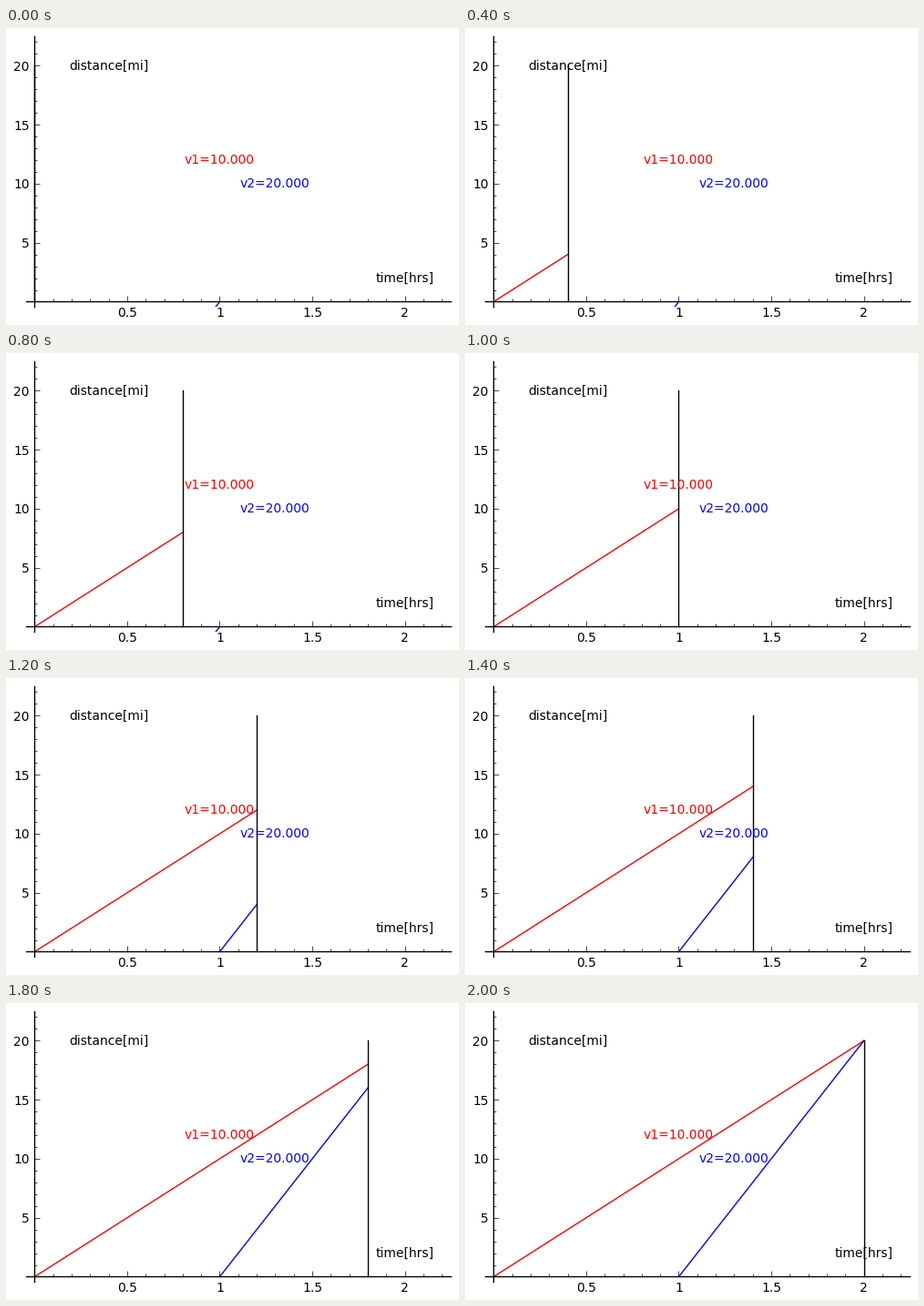
These frames come from a looping animation (497x326 px, 2200 ms). A matplotlib script:

```python
import matplotlib.pyplot as plt
from matplotlib.animation import FuncAnimation
from matplotlib.ticker import FuncFormatter, MultipleLocator

W, H, DPI = 497, 326, 100
FRAMES, STEP_MS = 11, 200
V1, V2, HEAD_START = 10, 20, 1
GOAL = 20

plt.rcParams.update({"font.family": "DejaVu Sans", "font.size": 10})

fig = plt.figure(figsize=(W / DPI, H / DPI), dpi=DPI, facecolor="white")

# Axes box in pixels, measured from the top left corner
left, right, top, bottom = 22.2, 488.4, 9.0, 306.3
ax = fig.add_axes([left / W, 1 - bottom / H, (right - left) / W, (bottom - top) / H])
ax.set_xlim(-0.045, 2.25)
ax.set_ylim(-0.45, 22.5)
ax.patch.set_visible(False)

for side in ("top", "right"):
    ax.spines[side].set_visible(False)
for side in ("left", "bottom"):
    ax.spines[side].set_position(("data", 0))
    ax.spines[side].set_linewidth(1)


def tick_label(value, _):
    return "" if abs(value) < 1e-9 else f"{value:g}"


for axis, major, minor in ((ax.xaxis, 0.5, 0.1), (ax.yaxis, 5, 1)):
    axis.set_major_locator(MultipleLocator(major))
    axis.set_minor_locator(MultipleLocator(minor))
    axis.set_major_formatter(FuncFormatter(tick_label))
ax.tick_params(which="major", direction="in", length=4, width=0.5, pad=4)
ax.tick_params(which="minor", direction="in", length=2, width=0.5)


def label(x, y, text, color="black"):
    ax.text(x, y, text, color=color, ha="center", va="center")


label(0.4, GOAL, "distance[mi]")
label(2, 2, "time[hrs]")
label(1, 12, f"v1={V1:.3f}", "red")
label(1.3, 10, f"v2={V2:.3f}", "blue")

first, = ax.plot([], [], color="red", lw=1)
second, = ax.plot([], [], color="blue", lw=1)
now, = ax.plot([], [], color="black", lw=1)


def draw(i):
    t = i * 0.2
    first.set_data([0, t], [0, V1 * t])
    second.set_data([HEAD_START, t], [0, V2 * (t - HEAD_START)])
    now.set_data([t, t], [0, GOAL])
    return first, second, now


anim = FuncAnimation(fig, draw, frames=FRAMES, interval=STEP_MS,
                     repeat=True, repeat_delay=0, blit=False)
plt.show()
```
